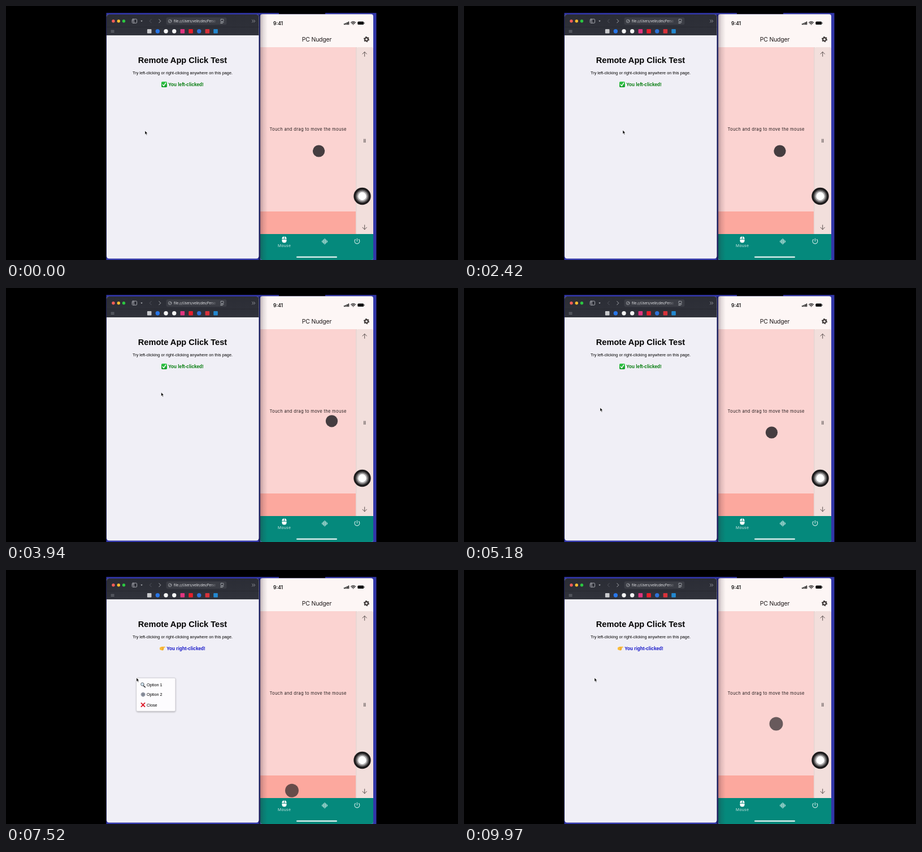
An HTML page for the animation above (10000 ms loop, 800 by 450 pixels).

```html
<!DOCTYPE html>
<html lang="en">
<head>
<meta charset="utf-8">
<title>Touch pad demo</title>
<style>
  html, body { margin: 0; width: 100%; height: 100%; overflow: hidden; background: #000; }
  svg { display: block; width: 800px; height: 450px; }
  .ui { font-family: Inter, Roboto, sans-serif; }
  .page { font-family: "Liberation Sans", Arial, sans-serif; }
  .mid { text-anchor: middle; }
  .line { fill: none; stroke-linecap: round; stroke-linejoin: round; }
</style>
</head>
<body>
<svg viewBox="0 0 800 450" xmlns="http://www.w3.org/2000/svg">
  <defs>
    <linearGradient id="cast">
      <stop offset="0" stop-color="#301c28" stop-opacity=".32"/>
      <stop offset=".4" stop-color="#301c28" stop-opacity=".13"/>
      <stop offset="1" stop-color="#301c28" stop-opacity="0"/>
    </linearGradient>
    <linearGradient id="fade">
      <stop offset="0" stop-color="#3b3d45" stop-opacity="0"/>
      <stop offset="1" stop-color="#3b3d45"/>
    </linearGradient>
    <linearGradient id="bar" x2="0" y2="1">
      <stop offset="0" stop-color="#2b2d35"/>
      <stop offset="1" stop-color="#30323b"/>
    </linearGradient>
    <linearGradient id="tick" x2="0" y2="1">
      <stop offset="0" stop-color="#35c94a"/>
      <stop offset="1" stop-color="#129c28"/>
    </linearGradient>
    <filter id="soft" x="-20%" y="-20%" width="140%" height="140%">
      <feGaussianBlur stdDeviation="1.6"/>
    </filter>
    <clipPath id="phoneClip"><rect x="450" y="14.5" width="200" height="435.5" rx="4"/></clipPath>
    <clipPath id="winClip"><rect x="178" y="15" width="269.5" height="432.5" rx="4.5"/></clipPath>
  </defs>

  <rect width="800" height="450"/>
  <rect x="177.5" y="12.3" width="478" height="437.7" fill="#3237a8"/>
  <rect x="483" y="12" width="82" height="2.5"/>
  <rect x="447" y="15" width="3" height="435" fill="#1d2060"/>

  <!-- phone -->
  <g clip-path="url(#phoneClip)" class="ui">
    <rect x="450" y="14" width="200" height="436" fill="#fdf6f5"/>
    <rect x="450" y="73" width="169" height="292" fill="#fbd3d1"/>
    <rect x="450" y="364" width="169" height="40" fill="#fca89e"/>
    <rect x="619.3" y="73" width="1.4" height="331" fill="#dcc6c4"/>
    <rect x="620.5" y="73" width="29.5" height="331" rx="2.5" fill="#f2dfdc"/>
    <rect x="450" y="404" width="200" height="46" fill="#05897c"/>
    <rect x="450" y="14" width="13" height="436" fill="url(#cast)"/>

    <text x="473" y="33.6" font-size="8.5" font-weight="600" fill="#111">9:41</text>
    <g fill="#111">
      <rect x="598" y="31" width="1.7" height="2.2" rx=".5"/>
      <rect x="600.5" y="30" width="1.7" height="3.2" rx=".5"/>
      <rect x="603" y="28.7" width="1.7" height="4.5" rx=".5"/>
      <rect x="605.5" y="27.4" width="1.7" height="5.8" rx=".5"/>
      <rect x="622.3" y="27.5" width="11" height="5.6" rx="1.7"/>
      <rect x="633.9" y="29.3" width=".8" height="2" rx=".4"/>
    </g>
    <g class="line" stroke="#111" stroke-width="1.3">
      <path d="M610.8 29.2Q614.6 26 618.4 29.2M612.3 31Q614.6 29 616.9 31M614.2 32.7h.8"/>
    </g>

    <text class="mid" x="550" y="63" font-size="10.4" letter-spacing="-.15" fill="#1d1819">PC Nudger</text>
    <g id="gear" transform="translate(638 59)" fill="none" stroke="#3a3433">
      <circle r="2.9" stroke-width="2.1"/>
      <circle r="4.3" stroke-width="1.5" stroke-dasharray="2.2 2.3"/>
    </g>

    <g class="line" stroke="#5b504f" stroke-width="1">
      <path d="M634.7 89.3v-8M631 85l3.7-3.8 3.7 3.8"/>
      <path d="M634.7 388v8M631 392.2l3.7 3.8 3.7-3.8"/>
    </g>
    <path d="M633.6 235.5v6.5M635.8 235.5v6.5" stroke="#857a79" stroke-width="1.5"/>

    <text class="mid" x="534.6" y="221.4" font-size="7.6" letter-spacing=".29" fill="#2a2122">Touch and drag to move the mouse</text>

    <g fill="#fff">
      <path d="M488.4 412.8a4 4.4 0 0 1 3.6-4.5v4.5zM493 408.3a4 4.4 0 0 1 3.6 4.5H493zM488.4 413.8h8.2v1.6a4.1 4.1 0 0 1-8.2 0z"/>
      <text class="mid" x="492.6" y="427" font-size="6.8" letter-spacing=".3" fill="#c9e6e2">Mouse</text>
      <rect x="514" y="443.8" width="72" height="2" rx="1"/>
    </g>
    <g class="line" stroke="#d3ebe8">
      <path id="wave" stroke-width=".9"/>
      <path d="M618.4 413.5a4.4 4.4 0 1 0 6 0M621.4 412v4.7" stroke-width="1.1"/>
    </g>
  </g>

  <circle id="dot" fill="#1c1c20"/>

  <g transform="translate(630.5 337)">
    <circle r="15.2" fill="#1d1b1c"/>
    <circle r="11.8" fill="#5a5859"/>
    <circle r="9.6" fill="#aaa8a9"/>
    <circle r="7.2" fill="#fff"/>
  </g>

  <!-- browser -->
  <g clip-path="url(#winClip)">
    <rect x="178" y="15" width="270" height="433" fill="#f0eff6"/>
    <rect x="178" y="15" width="270" height="36.7" fill="url(#bar)"/>
    <path d="M178 37.3h270" stroke="#24262d" stroke-width=".6"/>
    <path d="M178 51.5h270" stroke="#17181d" stroke-width=".6"/>
    <circle cx="190" cy="26.8" r="2.7" fill="#fb5d57"/>
    <circle cx="199.3" cy="26.8" r="2.7" fill="#fbbc2f"/>
    <circle cx="208.5" cy="26.8" r="2.7" fill="#2bc641"/>
    <g class="line" stroke="#b4b6bc" stroke-width=".9">
      <rect x="223.2" y="23.2" width="8.4" height="7" rx="1.3"/>
      <path d="M226.2 23.2v7M224.4 25h.5M224.4 26.7h.5"/>
      <path d="M270.8 23.6l3 3.1-3 3.1"/>
      <path d="M257.2 23.6l-3 3.1 3 3.1" stroke="#575a62"/>
      <path d="M435.6 24.6l2.1 2.2-2.1 2.2M438.6 24.6l2.1 2.2-2.1 2.2" stroke-width=".8"/>
      <path d="M186 43.2h5.2M186 44.9h5.2M186 46.6h5.2" stroke="#85878e" stroke-width=".7"/>
    </g>
    <path d="M238.3 25.8h3.4l-1.7 2.2z" fill="#b4b6bc"/>
    <rect x="283.5" y="20.3" width="107" height="13" rx="3" fill="#3b3d45"/>
    <g class="line" stroke="#c2c4c9" stroke-width=".7">
      <circle cx="290.2" cy="26.8" r="2.8"/>
      <path d="M289 28l2.5-2.5"/>
      <rect x="380" y="23.4" width="5" height="4" rx=".8"/>
      <path d="M379.8 29h5.4M379.8 30.6h3.4"/>
    </g>
    <text class="ui" x="297" y="28.9" font-size="5.6" fill="#e6e7ea">file:///Users/velin/dev/Perso</text>
    <rect x="361" y="21" width="13" height="11.5" fill="url(#fade)"/>
    <rect x="374" y="21" width="5" height="11.5" fill="#3b3d45"/>
    <g id="marks"></g>

    <g class="page" fill="#000">
      <text class="mid" x="312.5" y="101" font-size="14.6" font-weight="700">Remote App Click Test</text>
      <text class="mid" x="312.5" y="121" font-size="7.3">Try left-clicking or right-clicking anywhere on this page.</text>
    </g>

    <g id="left" class="page">
      <rect x="275" y="134" width="10" height="10" rx="1.8" fill="url(#tick)"/>
      <path class="line" d="M277.3 139.4l1.9 2.2 3.6-5.4" stroke="#fff" stroke-width="1.5"/>
      <text x="287.2" y="141.7" font-size="8.2" font-weight="700" fill="#007a0a">You left-clicked!</text>
    </g>
    <g id="right" class="page">
      <path d="M272 137.6q2.3-2 4.5-1.8h4.6q1 .2.9 1t-.9.8h-2.4q.9.4.7 1.2.4.8-.3 1.4.2.9-.6 1.3-.1 1-1.2 1-3 .1-5.3-1.4z" fill="#fbbd3c"/>
      <path class="line" d="M275.5 137.6h4M276.6 139h2.3M276.6 140.4h2.1M276.3 141.6h1.8" stroke="#d18a1c" stroke-width=".4"/>
      <text x="284.2" y="141.7" font-size="8.2" font-weight="700" fill="#1414c8">You right-clicked!</text>
    </g>

    <g id="menu" class="page">
      <rect x="231" y="192" width="69" height="59.5" rx="2" fill="#000" opacity=".3" filter="url(#soft)"/>
      <rect x="230.7" y="191.2" width="69.2" height="59" rx="2" fill="#fdfcfe" stroke="#c4c3c9" stroke-width=".6"/>
      <g class="line">
        <path d="M243 204.6l3.3 3" stroke="#37383d" stroke-width="1.6"/>
        <circle cx="241.4" cy="202.4" r="2.8" fill="#cfe3f0" stroke="#5a5d64" stroke-width=".9"/>
        <circle cx="242.6" cy="220.6" r="2.7" fill="#a5abb8" stroke="#747a88" stroke-width="1.2"/>
        <circle cx="242.6" cy="220.6" r="3.8" stroke="#8b91a0" stroke-width=".9" stroke-dasharray="1 .99" stroke-linecap="butt"/>
        <circle cx="242.6" cy="220.6" r="1" fill="#50555f"/>
        <path d="M239.5 235.8l6 6.2M245.6 235.7l-6.2 6.4" stroke="#dd2130" stroke-width="1.9"/>
      </g>
      <g font-size="7.3">
        <text x="249" y="206.4">Option 1</text>
        <text x="249" y="223.2">Option 2</text>
        <text x="249" y="241.6">Close</text>
      </g>
    </g>
  </g>

  <path id="arrow" d="M0 0v6.5l1.5-1.3 1.1 2.5 1.1-.5-1.1-2.4 2-.1z" fill="#000" stroke="#fff" stroke-width=".5" stroke-linejoin="round"/>
</svg>
<script>
const LOOP = 10000, FULL = 0.82, R = 10.6;
const LIFT = 6300, MENU_ON = 7490, MENU_OFF = 9950;
const $ = id => document.getElementById(id);

// time, x, y
const cursorPath = [[0, 246, 221], [1330, 209, 200], [2420, 281, 220], [3940, 274.7, 185],
  [5180, 241, 212], [6200, 231, 191]];
const fingerPath = [[0, 553.6, 257], [1330, 521, 255.7], [2420, 559, 257], [3940, 576.5, 235.8],
  [5180, 544.5, 256], [6200, 534, 240]];
// press time, release time, x, y
const taps = [[7330, 7490, 506, 390.8], [9790, 9940, 552.5, 272.5]];

const clamp = v => Math.max(0, Math.min(1, v));

// Smooth curve through timed points
function along(pts, t) {
  const last = pts.length - 1;
  if (t >= pts[last][0]) return pts[last].slice(1);
  let i = 0;
  while (t >= pts[i + 1][0]) i++;
  const a = pts[i], b = pts[i + 1], d = b[0] - a[0], u = (t - a[0]) / d;
  const slope = (k, c) => {
    if (k === 0 || k === last) return 0;
    const p = pts[k - 1], n = pts[k + 1];
    return (n[c] - p[c]) / (n[0] - p[0]);
  };
  return [1, 2].map(c =>
    a[c] * (1 + 2 * u) * (1 - u) ** 2 + b[c] * u * u * (3 - 2 * u) +
    d * (slope(i, c) * u * (1 - u) ** 2 - slope(i + 1, c) * u * u * (1 - u)));
}

// The dot grows a little while it fades out
function touch(t) {
  if (t < LIFT + 160) {
    const out = clamp((t - LIFT) / 160);
    return [...along(fingerPath, t), R + 8 * out, FULL * (1 - out)];
  }
  const tap = taps.find(([on, off]) => t >= on && t < off + 160);
  if (!tap) return [0, 0, R, 0];
  const [on, off, x, y] = tap;
  const out = clamp((t - off) / 160);
  return [x, y, R + 7 * out, FULL * clamp((t - on) / 80) * (1 - out)];
}

function show(id, on) {
  $(id).setAttribute("visibility", on ? "visible" : "hidden");
}

function draw(t) {
  const [cx, cy] = along(cursorPath, t);
  $("arrow").setAttribute("transform", `translate(${cx} ${cy})`);
  const [x, y, r, alpha] = touch(t), dot = $("dot");
  dot.setAttribute("cx", x);
  dot.setAttribute("cy", y);
  dot.setAttribute("r", r);
  dot.setAttribute("opacity", alpha);
  show("left", t < MENU_ON);
  show("right", t >= MENU_ON);
  show("menu", t >= MENU_ON && t < MENU_OFF);
}

const colors = ["#c9cacd", "#2876e8", "#f4f4f4", "#f4f4f4", "#e0357f", "#e8202c", "#2d72d9", "#d8323a", "#2388cf"];
$("marks").innerHTML = colors.map((c, i) => {
  const x = 253.7 + i * 14.67;
  return [1, 2, 3, 6].includes(i)
    ? `<circle cx="${x}" cy="44.8" r="3.7" fill="${c}"/>`
    : `<rect x="${x - 3.8}" y="41" width="7.6" height="7.6" rx="1" fill="${c}"/>`;
}).join("");

$("wave").setAttribute("d", [1, 2.4, 3.6, 5, 3.6, 2.4, 1].map((h, i) =>
  `M${559.6 + i * 1.5} ${417.2 - h}v${2 * h}`).join(""));

const start = performance.now();
function tick() {
  draw((performance.now() - start) % LOOP);
  requestAnimationFrame(tick);
}
draw(0);
requestAnimationFrame(tick);
</script>
</body>
</html>
```
